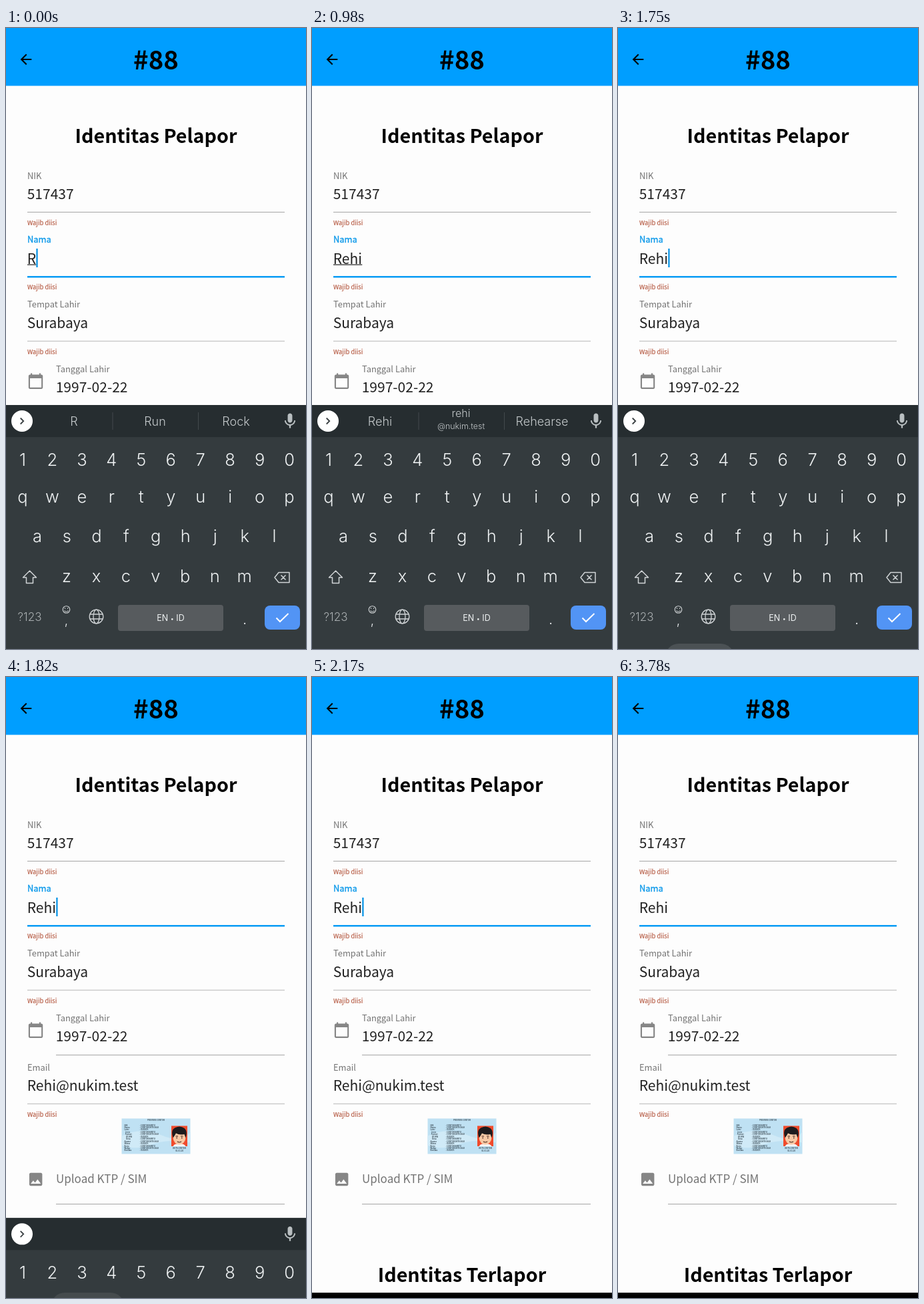
These frames come from a looping animation (450 px wide and 929 px high, 3850 ms). An HTML page:

```html
<!DOCTYPE html>
<html lang="id">
<head>
<meta charset="utf-8">
<title>Identitas Pelapor</title>
<style>
  html, body { margin: 0; width: 100%; height: 100%; overflow: hidden; background: #fdfdfd; }
  svg { display: block; width: 450px; height: 929px; }
  text { font-family: "Noto Sans CJK JP", "Noto Sans CJK SC", "Noto Sans CJK", sans-serif; white-space: pre; }
  .head { font-size: 28.7px; font-weight: 700; text-anchor: middle; }
  .value { font-size: 21px; fill: #212121; }
  .label { font-size: 12.9px; fill: #737373; }
  .focus { fill: #129bea; stroke: #129bea; stroke-width: .35; }
  .hint { font-size: 9.4px; fill: #b4573f; stroke: #b4573f; stroke-width: .15; }
  .icon { fill: #868686; }
  #board text { font-family: Inter, Roboto, sans-serif; font-weight: 300; text-anchor: middle; fill: #eef1f2; }
  #board .key { font-size: 25.5px; font-weight: 350; }
  #board .word { font-size: 18px; fill: #c3c8ca; }
  #board .mail { font-size: 12.4px; fill: #c3c8ca; }
  .line { fill: none; stroke: #d0d4d6; stroke-width: 1.5; stroke-linejoin: round; }
  .card text { font-size: 2.8px; font-weight: 700; fill: #3a4a55; }
</style>
</head>
<body>
<svg viewBox="0 0 450 929">
  <rect width="450" height="929" fill="#fdfdfd"/>
  <rect width="450" height="86.500" fill="#009eff"/>
  <path transform="translate(17.500 34.500) scale(1.040)" d="M20 11H7.830l5.590-5.590L12 4l-8 8 8 8 1.410-1.410L7.830 13H20z"/>
  <text x="225" y="62" class="head" style="font-size:38.300px">#88</text>
  <text x="225" y="172" class="head">Identitas Pelapor</text>

  <text x="32" y="226" class="label">NIK</text>
  <text x="31.700" y="256" class="value">517437</text>
  <text x="32" y="321" class="label focus">Nama</text>
  <text x="31.700" y="352.500" class="value" id="name"></text>
  <rect id="under" x="32" y="353.500" height="1.300" fill="#333"/>
  <rect id="caret" y="330" width="2.300" height="28" fill="#0b95e6"/>
  <text x="32" y="418" class="label">Tempat Lahir</text>
  <text x="31.700" y="449" class="value">Surabaya</text>
  <text x="75" y="514.500" class="label">Tanggal Lahir</text>
  <text x="74.700" y="545" class="value">1997-02-22</text>
  <text x="32" y="588.500" class="label">Email</text>
  <text x="31.700" y="619" class="value">Rehi@nukim.test</text>
  <text x="75" y="756.500" class="label" style="font-size:17px">Upload KTP / SIM</text>
  <g id="hints"></g>

  <path d="M32 275.500H418M75 565.500H418M75 788.500H418" stroke="#a6a6a6"/>
  <path d="M32 468.500H418M32 638.500H418" stroke="#cbcbcb" stroke-width="1.600"/>
  <path d="M32 372.300H418" stroke="#089cf5" stroke-width="2.400"/>

  <path class="icon" transform="translate(31.700 515.400) scale(1.070)" d="M20 3h-1V1h-2v2H7V1H5v2H4c-1.100 0-2 .9-2 2v16c0 1.100.9 2 2 2h16c1.100 0 2-.9 2-2V5c0-1.100-.9-2-2-2zm0 18H4V8h16z"/>
  <path class="icon" transform="translate(31.700 738.600) scale(1.080)" d="M21 19V5c0-1.100-.9-2-2-2H5c-1.100 0-2 .9-2 2v14c0 1.100.9 2 2 2h14c1.100 0 2-.9 2-2zM8.500 13.500l2.500 3L14.500 12l4.500 6H5z"/>

  <g class="card" transform="translate(173.500 660.500)">
    <rect width="103" height="53" fill="#bfe1f3"/>
    <path d="M0 26Q30 12 60 25T103 20V36Q70 30 45 39T0 40Z" fill="#d0eaf7"/>
    <text x="51.500" y="3" text-anchor="middle">PROVINSI CONTOH</text>
    <g id="lines"></g>
    <rect x="74.500" y="11" width="24" height="30.500" fill="#f04b2c"/>
    <path d="M77 41.500Q79 37.500 86.500 37.500T96 41.500Z" fill="#f4f4f4"/>
    <ellipse cx="86.500" cy="29" rx="9.300" ry="10" fill="#f7c9a5"/>
    <path d="M77 29Q73.500 18 79 14.500Q87 9.500 94 14.500Q99.500 19 96 29L94 23.500Q86 25 81.500 22Q80 25 77 29Z" fill="#1d1b1d"/>
    <path d="M81 26.500h3.500M88.500 26.500h3.500M82.700 28v2M90.300 28v2M83.500 34.500q3 2 6 0" fill="none" stroke="#44261c" stroke-width="1.200"/>
    <text x="86.700" y="45.500" text-anchor="middle">KOTA CONTOH</text>
    <text x="86.700" y="49.500" text-anchor="middle">01-01-20</text>
  </g>

  <g id="after">
    <text x="225" y="905" class="head">Identitas Terlapor</text>
    <rect y="921" width="450" height="8"/>
  </g>

  <g id="board">
    <rect y="564" width="450" height="370" fill="#343b3e"/>
    <rect y="564" width="450" height="48" fill="#262d30"/>
    <circle cx="24" cy="588" r="16" fill="#fff"/>
    <path d="M21.700 583.500l4.500 4.500-4.500 4.500" fill="none" stroke="#3a4043" stroke-width="1.800"/>
    <path transform="translate(412.200 574.300) scale(1.150)" fill="#b9bfc1" d="M12 14c1.660 0 3-1.340 3-3V5c0-1.660-1.340-3-3-3S9 3.340 9 5v6c0 1.660 1.340 3 3 3zm5.300-3c0 3-2.540 5.100-5.300 5.100S6.700 14 6.700 11H5c0 3.410 2.720 6.230 6 6.720V21h2v-3.280c3.280-.48 6-3.300 6-6.720z"/>
    <g id="words">
      <path d="M160 575V601M288.500 575V601" stroke="#42494c"/>
      <text x="102" y="595" class="word" id="w0"></text>
      <text x="223.500" y="595" class="word" id="w1"></text>
      <text x="345" y="595" class="word" id="w2"></text>
      <text x="223.500" y="600" class="mail" id="mail">@nukim.test</text>
    </g>
    <g id="keys"></g>

    <path class="line" d="M35.500 812l10 10h-5v8.500h-10V822h-5z"/>
    <path class="line" d="M409 814.500h16v15h-16l-6-7.500zM412.500 818.500l7 7m0-7l-7 7"/>
    <text x="35.500" y="887" style="font-size:17px;fill:#a9aeb0">?123</text>
    <g class="line" style="stroke-width:1.100">
      <circle cx="90.500" cy="870" r="5.300"/>
      <path d="M87.500 871.500q3 3.500 6 0M88.500 867.500v1.500M92.500 867.500v1.500"/>
    </g>
    <text x="90.500" y="893" style="font-size:19px">,</text>
    <g class="line" style="stroke-width:1.300">
      <circle cx="135.500" cy="880.500" r="10.300"/>
      <ellipse cx="135.500" cy="880.500" rx="4.500" ry="10.300"/>
      <path d="M126 877h19M126 884h19"/>
    </g>
    <rect x="168" y="863" width="158" height="39" rx="4" fill="#575b5e"/>
    <text x="247" y="887" style="font-size:12.500px;font-weight:400">EN <tspan style="font-size:9px">•</tspan> ID</text>
    <text x="358" y="892" style="font-size:22px">.</text>
    <rect x="388" y="864" width="53" height="36" rx="8" fill="#5294f5"/>
    <path d="M405.500 882.500l5.500 5.500 12.500-12" fill="none" stroke="#fff" stroke-width="2"/>

    <g id="popup">
      <rect x="-22" y="-97" width="44" height="116" rx="5" fill="#262c2f"/>
      <text y="-69" class="key" id="big"></text>
      <text x="10" y="-55" style="font-size:14px;fill:#a9aeb0" id="more">…</text>
    </g>
  </g>
  <rect id="chip" y="921" height="40" rx="20" fill="#4b5154"/>
</svg>
<script>
const LOOP = 3850, TICK = 70, HIDE = 1750;
const $ = id => document.getElementById(id);
const show = (id, on) => $(id).setAttribute('visibility', on ? 'visible' : 'hidden');
const set = (id, attrs) => { for (const k in attrs) $(id).setAttribute(k, attrs[k]); };

function addText(parent, text, x, y, cls) {
  const el = document.createElementNS('http://www.w3.org/2000/svg', 'text');
  el.setAttribute('x', x);
  el.setAttribute('y', y);
  el.setAttribute('class', cls);
  el.textContent = text;
  $(parent).append(el);
}

// Keyboard letters, each row with its first centre and baseline
const spots = {};
[['1234567890', 25, 654.5], ['qwertyuiop', 25, 709.5], ['asdfghjkl', 47, 769], ['zxcvbnm', 91, 829]]
  .forEach(([row, x0, y]) => [...row].forEach((c, i) => {
    const x = x0 + i * 44.45;
    spots[c] = [x, y];
    addText('keys', c, x, y, 'key');
  }));

for (const y of [294.5, 391, 487.5, 657.5]) addText('hints', 'Wajib diisi', 32, y, 'hint');

['NIK', 'Nama', 'Lahir', '  Jenis', '  Alamat', '    RT/RW', '    Desa', 'Agama', 'Status', 'Kerja', 'Warga', 'Berlaku']
  .forEach((s, i) => {
    const y = 11 + i * 3.45;
    addText('lines', s, 4, y, '');
    addText('lines', ': ' + ['CONTOH KARTU', 'CONTOH DATA SAJA', 'ISI DATA'][i % 3], 27, y, '');
  });

// Step tables: [start, ...state]
const typed = [[0, 'R'], [140, 'Re'], [210, 'Reh'], [420, 'Rehi']];
const words = [
  [0, 'R', 'Run', 'Rock'],
  [140, 'Re', 'Red', 'Rest'],
  [210, 'Reh', 'Rehi', 'Rehat'],
  [630, 'Rehi', 'rehi', 'Rehearse']
];
const presses = [[0, ''], [70, 'e'], [140, 'h'], [280, 'i'], [490, '']];
const at = (steps, t) => steps.filter(s => s[0] <= t).pop();

function draw(t) {
  $('name').textContent = at(typed, t)[1];
  const len = $('name').getComputedTextLength();
  set('under', { width: len });
  show('under', t < 1680);
  set('caret', { x: 32 + len });
  show('caret', t < 980 || (t >= 1470 && t < 2240));

  const [start, ...list] = at(words, t);
  const mail = start === 630;
  list.forEach((w, i) => { $('w' + i).textContent = w; });
  set('w1', { y: mail ? 582 : 595 });
  $('w1').style.fontSize = mail ? '16px' : '18px';
  $('words').style.display = t < 1680 ? '' : 'none';
  $('mail').style.display = mail ? '' : 'none';

  const key = at(presses, t)[1];
  $('popup').style.display = key ? '' : 'none';
  if (key) {
    set('popup', { transform: `translate(${spots[key]})` });
    $('big').textContent = key;
    $('more').style.display = key === 'h' ? 'none' : '';
  }

  const p = Math.min(1, Math.max(0, (t - HIDE) / 210));
  const drop = 365 * (1 - (1 - p) ** 2.75);
  set('board', { transform: `translate(0 ${drop})` });
  show('board', p < 1);
  show('after', p === 1);

  const grow = Math.min(1, p * 1.5) * 6;
  set('chip', { x: 71 - grow, width: 103 + grow * 2, opacity: 1 - p * .8 });
  show('chip', t >= HIDE && p < 1);
}

function frame(now) {
  draw(Math.floor((now % LOOP) / TICK) * TICK);
  requestAnimationFrame(frame);
}
draw(0);
requestAnimationFrame(frame);
</script>
</body>
</html>
```
